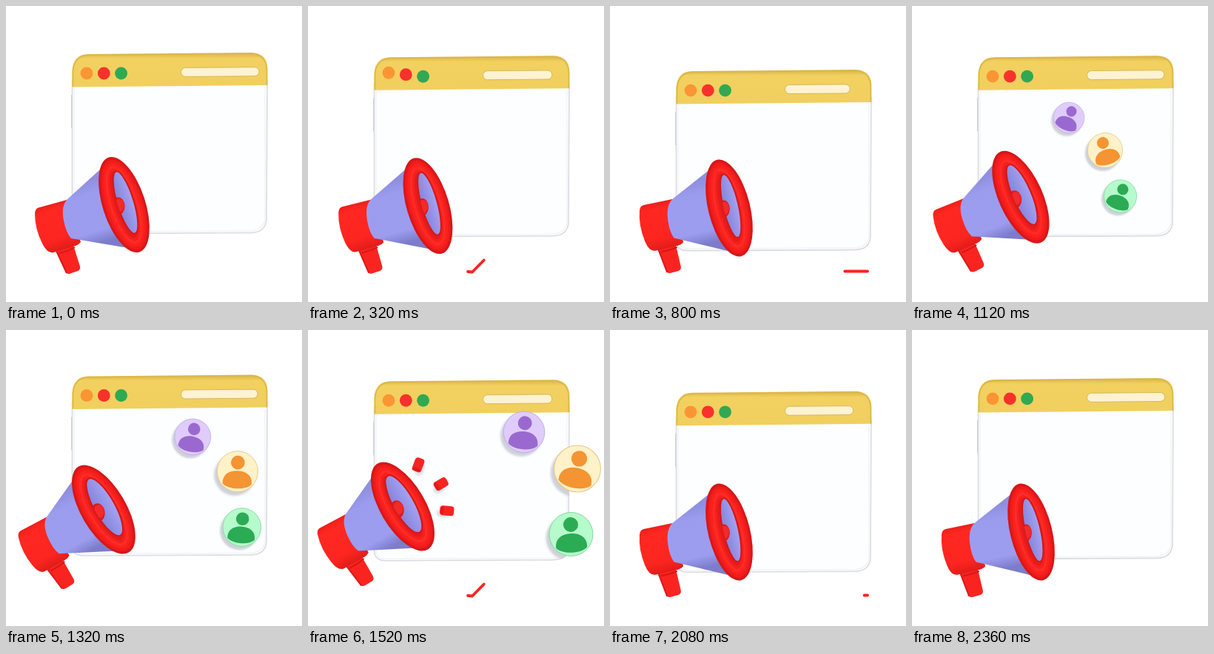
Animation of 400x400 px, one loop 2.4 s. Source, as an HTML page:

```html
<!DOCTYPE html>
<html lang="en">
<head>
<meta charset="utf-8">
<title>Announcement</title>
<style>
html, body { margin: 0; width: 100%; height: 100%; overflow: hidden; background: #fff; }
svg { display: block; width: 100vw; height: 100vh; }
</style>
</head>
<body>
<svg viewBox="0 0 400 400" xmlns="http://www.w3.org/2000/svg">
  <defs>
    <linearGradient id="cone" gradientUnits="userSpaceOnUse" x1="98" y1="240" x2="122" y2="322">
      <stop offset="0" stop-color="#8f8fe0"/><stop offset=".2" stop-color="#9c9cee"/>
      <stop offset=".8" stop-color="#9d9df0"/><stop offset="1" stop-color="#7c7ccb"/>
    </linearGradient>
    <linearGradient id="barrel" gradientUnits="userSpaceOnUse" x1="60" y1="268" x2="79" y2="329">
      <stop offset="0" stop-color="#ee1f1c"/><stop offset=".15" stop-color="#ff2821"/>
      <stop offset=".75" stop-color="#fc2520"/><stop offset="1" stop-color="#e01c1a"/>
    </linearGradient>
    <linearGradient id="inside">
      <stop offset="0" stop-color="#8583d8"/><stop offset="1" stop-color="#a5a3f4"/>
    </linearGradient>
    <linearGradient id="head" x2="0" y2="1">
      <stop offset="0" stop-color="#dcb84a"/><stop offset=".1" stop-color="#e6c355"/>
      <stop offset=".17" stop-color="#f2d160"/><stop offset="1" stop-color="#f1cf5e"/>
    </linearGradient>
    <filter id="blur" x="-30%" y="-30%" width="160%" height="160%"><feGaussianBlur stdDeviation="1.5"/></filter>
    <clipPath id="mouthClip"><ellipse id="mouthCut" ry="44" transform="translate(2 -3) rotate(-17)"/></clipPath>
    <clipPath id="page"><path d="M89 85Q90 65 111 65L332 63Q353 63 353 85V290Q352 307 333 307H104Q89 307 89 294Z"/></clipPath>
  </defs>

  <g id="win">
    <path d="M88.700 120V165" stroke="#9c9be6" opacity=".7"/>
    <path d="M89.500 100V294Q90 307.500 105 307.500L331 306.500Q351 306 352 288L353 100Z" fill="#fcfeff" stroke="#d9dbe0" stroke-width="1.600"/>
    <path d="M92 110V294Q93 305 105 305L330 304Q348 303 350 288V110" fill="none" stroke="#f1f3f6" stroke-width="1.500"/>
    <path d="M89.300 109.500V87Q91 65.500 111 65L332 63Q353 64 353.500 84V107Z" fill="url(#head)"/>
    <path d="M90.500 109V88Q92 67 112 66.500L331 64.500Q351 65 352.300 85V107" fill="none" stroke="#dab74a" stroke-width="1.600"/>
    <g id="dots"></g>
    <rect id="bar" x="236.500" y="83.500" height="12" rx="6" fill="#fdf3d2" stroke="#cfae4c" stroke-width=".8" transform="rotate(-.5 236 90)"/>
    <g id="shade" clip-path="url(#page)"></g>
  </g>
  <path id="pulse" d="M216 359L222 359.500L248 333L263 362L282 326L306 358.500H348" fill="none" stroke="#fb2320" stroke-width="3.800" stroke-linejoin="round" stroke-linecap="round"/>
  <g id="people"></g>

  <g id="horn">
    <g transform="translate(-159.500 -268.500)">
      <path d="M67 330L81 360Q83 363 87 361.500L97 358Q101 356 100 352L90 320Z" fill="#f92420"/>
      <path d="M68 331L82 361" stroke="#d91a19" stroke-width="2"/>
      <path d="M72 334Q84 331 93 326" fill="none" stroke="#d41817" stroke-width="2"/>
      <path d="M44 272.500L82 262L101 319Q98 323 94 324L64 333Q56 335 49 321Q39 301 39 281Q39 274 44 272.500Z" fill="url(#barrel)"/>
      <path d="M127 221L83 261Q74 270 78 290Q81 306 88 314L165 327Z" fill="url(#cone)"/>
    </g>
    <g id="ring"></g>
    <ellipse id="mouth" ry="44" fill="url(#inside)" stroke="#d21818" stroke-width="2" transform="translate(2 -3) rotate(-17)"/>
    <g clip-path="url(#mouthClip)">
      <ellipse cx="-8" cy="2" rx="9" ry="12" fill="#d91b1d"/>
      <ellipse cx="-6.500" cy="1" rx="6.500" ry="9" fill="#f3292a"/>
    </g>
    <g id="sparks"></g>
  </g>
</svg>
<script>
const LOOP = 2400, BEAT = 1200;
const $ = id => document.getElementById(id);
const set = (e, k, v) => e.setAttribute(k, v);

function add(parent, tag, attrs = {}) {
  const e = document.createElementNS('http://www.w3.org/2000/svg', tag);
  for (const k in attrs) set(e, k, attrs[k]);
  return parent.appendChild(e);
}

const clamp = x => Math.max(0, Math.min(1, x));
const ease = x => { x = clamp(x); return x * x * (3 - 2 * x); };
const ramp = (t, a, b) => ease((t - a) / (b - a));
const bump = (t, a, b, c, d) => ramp(t, a, b) - ramp(t, c, d);
const wave = (t, peak, period = BEAT) => Math.cos(2 * Math.PI * (t - peak) / period);
const hop = x => Math.sin(Math.PI * clamp(x));
const mix = (a, b, u) => a + (b - a) * u;

const dots = ['#fb9534', '#f9312c', '#30a952'].map((fill, i) =>
  add($('dots'), 'circle', { cx: 109 + i * 23.3, r: 8.4, fill }));

// nested ellipses shade the round rim, from edge to mouth
const rimColors = ['#d81718', '#f01c1b', '#fb211e', '#ff2b25', '#f5201e', '#e51b1b'];
const rim = rimColors.map((fill, i) => ({
  rx: 28.8 - 3.2 * i,
  el: add($('ring'), 'ellipse', { ry: 67.2 - 4 * i, fill, transform: 'rotate(-18)' })
}));

// path: stops after leaving the mouth; tilt and sway in degrees
const people = [
  { disc: '#dfccfb', ink: '#9a69d0', edge: '#c3a9e6', size: 28.3, tilt: 13, sway: 9,
    path: [[212, 151], [292, 138], [270.5, 116.5]] },
  { disc: '#fff1c8', ink: '#f49432', edge: '#e5c98a', size: 32, tilt: -2, sway: -15,
    path: [[261, 195], [364, 187.5], [310, 195]] },
  { disc: '#b6fbcb', ink: '#2bab53', edge: '#85d6a0', size: 30, tilt: 8, sway: 12,
    path: [[281.5, 257], [355.5, 276], [350, 275]] }
];
const mouth = [158, 256], times = [980, 1120, 1520, 1800, 2120], sizes = [0, .75, 1, .97, 0];
for (const p of people) {
  p.stops = [mouth, ...p.path, mouth];
  p.shade = add($('shade'), 'circle', { r: 30, fill: '#cfd1d8', filter: 'url(#blur)' });
  p.g = add($('people'), 'g');
  add(p.g, 'circle', { r: 29.5, fill: p.disc, stroke: p.edge });
  p.turn = add(p.g, 'g');
  add(p.turn, 'circle', { cy: -13, r: 10, fill: p.ink });
  add(p.turn, 'path', { d: 'M-21 18C-22 5-12-1 0-1S22 5 21 18C13 27-13 27-21 18Z', fill: p.ink });
}

// three rods fan out of the mouth
const sparks = [-57, -18, 18].map(angle => {
  const g = add($('sparks'), 'g');
  add(g, 'ellipse', { cx: -5, cy: 4, rx: 9, ry: 6, fill: '#dddfe4', filter: 'url(#blur)' });
  add(g, 'rect', { x: -9.5, y: -6.5, width: 19, height: 13, rx: 4, fill: '#f92320' });
  add(g, 'ellipse', { cx: -6.5, rx: 2.3, ry: 5.5, fill: '#dc1b1b' });
  return { g, angle };
});

const pulse = $('pulse'), pulseLen = pulse.getTotalLength();

function drawWindow(t, lift) {
  set($('win'), 'transform', `translate(0 ${lift})`);
  set($('bar'), 'width', 94 + 11.5 * wave(t, 10));
  dots.forEach((d, i) => {
    const up = start => hop((t - start - i * 100) / 300);
    set(d, 'cy', 91 - 5 * (up(170) + up(1575)));
  });
}

function drawPulse(t) {
  const from = pulseLen * ramp(t, 425, 925), to = pulseLen * ramp(t, 190, 740);
  set(pulse, 'visibility', to - from > .5 ? 'visible' : 'hidden');
  set(pulse, 'stroke-dasharray', `${Math.max(to - from, .01)} 999`);
  set(pulse, 'stroke-dashoffset', -from);
}

function drawPeople(t, lift) {
  const i = Math.max(0, Math.min(3, times.findIndex(x => x > t) - 1));
  const leg = t < times[4] ? i : 3;
  const u = ramp(t, times[leg], times[leg + 1]);
  for (const p of people) {
    const [x, y] = [0, 1].map(c => mix(p.stops[leg][c], p.stops[leg + 1][c], u));
    const s = p.size / 30 * mix(sizes[leg], sizes[leg + 1], u);
    set(p.g, 'transform', `translate(${x} ${y}) scale(${s})`);
    set(p.turn, 'transform', `rotate(${p.tilt + p.sway * wave(t, 1120, 680)})`);
    set(p.shade, 'transform', `translate(${x - 4 * s} ${y + 5 * s - lift}) scale(${s})`);
  }
}

function drawHorn(t) {
  const slide = bump(t, 850, 1450, 1680, 1920);
  const rise = bump(t, 850, 1450, 1540, 1840);
  const tip = bump(t, 800, 1350, 1540, 1760);
  const kick = 1 - ramp(t, 0, 800);
  const rot = 4 - 16.5 * tip - 4 * kick;
  const x = 161 - 33 * slide + 2 * hop(t / 800) - 1.5 * kick;
  const y = 273 - 34.5 * rise - 4.5 * kick;
  set($('horn'), 'transform', `translate(${x} ${y}) rotate(${rot})`);
  // the mouth opens a little as the horn tips back
  rim.forEach(r => set(r.el, 'rx', r.rx - .13 * rot));
  for (const id of ['mouth', 'mouthCut']) set($(id), 'rx', 11.3 - .22 * rot);

  const out = bump(t, 1300, 1500, 1660, 2000), spin = 190 * ramp(t, 1660, 2000);
  for (const s of sparks)
    set(s.g, 'transform', `rotate(${s.angle}) translate(${60 * out}) rotate(${spin}) scale(${out})`);
}

function draw(t) {
  const lift = 10.9 - 13.4 * wave(t, 120);
  drawWindow(t, lift);
  drawPulse(t % BEAT);
  drawPeople(t, lift);
  drawHorn(t);
}

const start = performance.now();
function tick() {
  draw((performance.now() - start) % LOOP);
  requestAnimationFrame(tick);
}
draw(0);
requestAnimationFrame(tick);
</script>
</body>
</html>
```
